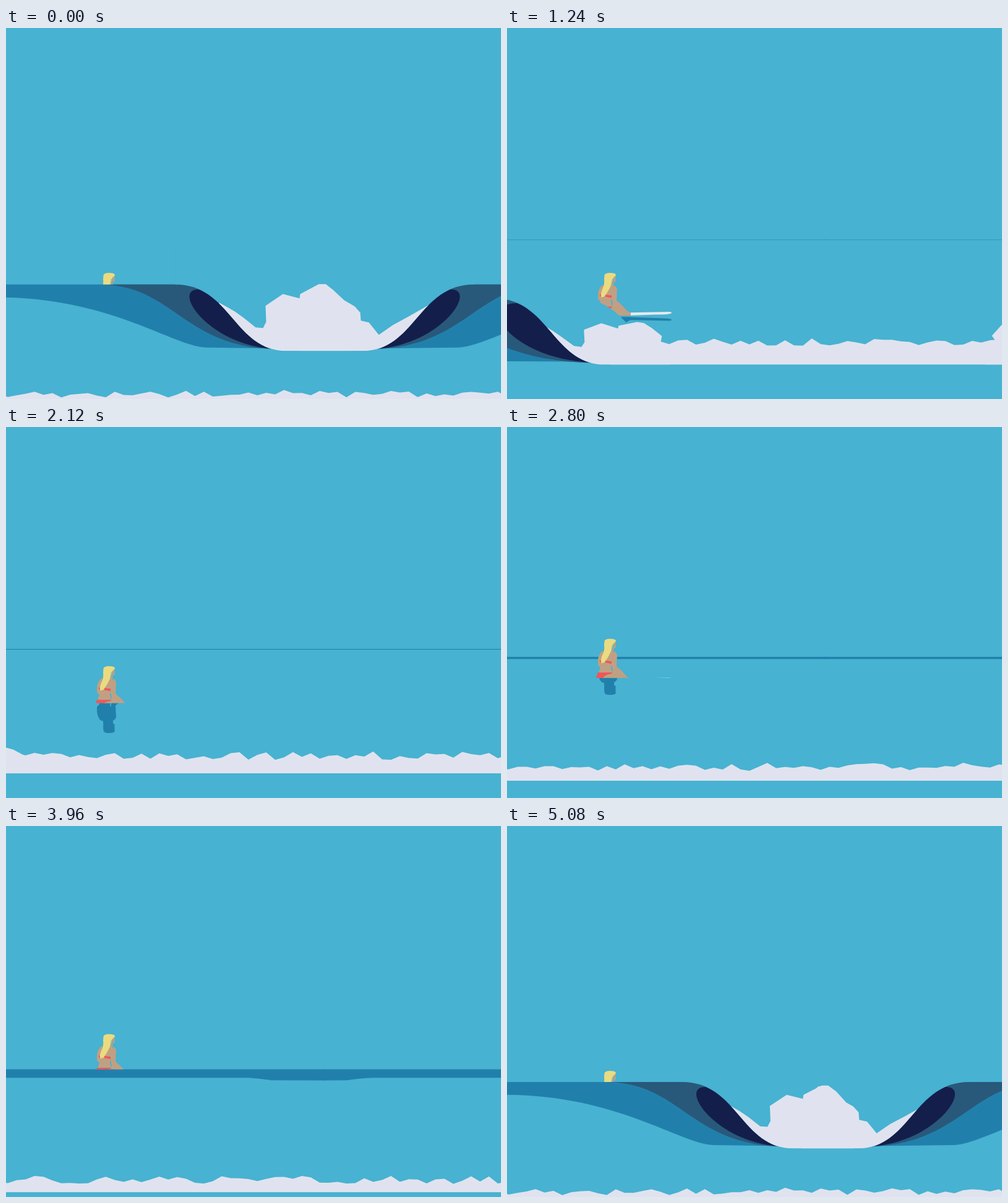
These frames come from a looping animation (800x600 px, 5120 ms). An HTML page with a canvas:

```html
<!DOCTYPE html>
<html lang="en">
<head>
<meta charset="utf-8">
<title>Waves</title>
<style>
html, body { margin: 0; width: 100%; height: 100%; overflow: hidden; background: #47b2d1; }
canvas { display: block; }
</style>
</head>
<body>
<canvas id="stage" width="800" height="600"></canvas>
<script>
const ctx = document.getElementById('stage').getContext('2d');
const LOOP = 5120, STEP = 40;
const SKY = '#47b2d1', BLUE = '#2180ab', SLATE = '#28597a', NAVY = '#141e4b', FOAM = '#e0e3ef';
const CENTER = 515, FACE_WIDTH = 180, FACE_DEPTH = 107.5;

// Layer edges as Bezier points, measured from where the wave's face starts.
const BLUE_EDGE = [[-300, 0], [-110, -4], [-5, 79], [50, 81]];
const SLATE_EDGE = [[-119, 0], [-2, 3], [13, 100], [160, 104.5]];
const NAVY_EDGE = [[36, 8], [-5, 10], [55, 98], [158, 104]];
// Splash outlines: distance from the face start, height above the base.
const SPLASH_LEFT = [[71, 78], [82, 72], [96, 64], [110, 54], [130, 38], [142, 37], [147, 47], [146, 73],
  [174, 92], [201, 85], [202, 92], [232, 108], [243, 108], [256, 98], [272, 80], [270, 62], [285, 44]];
const SPLASH_RIGHT = [[72, 75], [107, 55], [131, 42], [154, 26], [170, 46], [183, 49], [184, 62], [193, 72],
  [210, 82], [224, 95], [240, 108], [252, 106], [268, 80], [258, 55], [279, 45]];

const clamp = v => Math.min(1, Math.max(0, v));
const mix = (a, b, k) => a + (b - a) * k;
function smooth(v) {
  const k = clamp(v);
  return k * k * (3 - 2 * k);
}

function hash(i, k) {
  const v = Math.sin(i * 127.1 + k * 311.7) * 43758.5453;
  return v - Math.floor(v);
}
function noise(i, time) {
  const k = Math.floor(time / 900);
  return mix(hash(i, k), hash(i, k + 1), time / 900 - k) - .5;
}

function fill(color) {
  ctx.fillStyle = color;
  ctx.fill();
}

function crestAt(time) {
  const age = time - LOOP;
  return 414.7 + .0182 * age - 1.2e-7 * age * age;
}

const facePoints = (w, depth) => [[0, 0], [.5 * w, 0], [.53 * w, depth], [w, depth]];

function curve([start, ...rest], x = 0, y = 0, dir = 1) {
  ctx.lineTo(x + dir * start[0], y + start[1]);
  ctx.bezierCurveTo(...rest.flatMap(([px, py]) => [x + dir * px, y + py]));
}

// A wave is a far line at 1160 ms, opens from 4300 ms and breaks outwards from 5080 ms.
function waveAt(time) {
  const rise = clamp((time - 4300) / 780);
  const w = mix(FACE_WIDTH / 2, FACE_WIDTH, rise);
  const half = w + 52 * rise ** 1.5 + .238 * Math.max(0, time - 5080);
  return {
    time, rise, w, half,
    depth: FACE_DEPTH * rise,
    swell: clamp((time - 3900) / 1180),
    spread: clamp((time - LOOP) / 680),
    band: .4 + 20.6 * smooth((time - 1160) / 3900) ** 2
  };
}

// Inner layers peel away from the face as the wave rises; later they lean back.
function drawInnerLayer(wave, points, lean, color) {
  const face = facePoints(wave.w, wave.depth), k = wave.rise ** 2;
  const edge = points.map(([x, y], i) => [
    mix(face[i][0], x, k) - (i % 3 ? lean * wave.spread : 0),
    mix(face[i][1], y, k)
  ]);
  if (color === SLATE) edge[0][0] -= lean * wave.spread;
  ctx.beginPath();
  curve(edge);
  ctx.lineTo(edge[3][0], edge[0][1]);
  fill(color);
}

function drawSide(wave, dir) {
  const { half, swell, band, rise, spread } = wave;
  ctx.save();
  ctx.translate(CENTER - dir * half, 0);
  ctx.scale(dir, 1);

  const lean = (dir < 0 ? 50 - 75 * rise : 0) - 36 * spread;
  ctx.beginPath();
  ctx.moveTo(-2000, 0);
  ctx.lineTo(-2000, band);
  curve(BLUE_EDGE.map(([x, y]) => [x * Math.min(1, swell + .1) + lean, band + y * swell]));
  ctx.lineTo(half + 1, band + 83.5 * swell);
  ctx.lineTo(half + 1, 0);
  fill(BLUE);

  if (rise > 0) {
    drawInnerLayer(wave, SLATE_EDGE, 52, SLATE);
    drawInnerLayer(wave, NAVY_EDGE, 25, NAVY);
  }
  ctx.restore();
}

function drawSplash(wave, points, dir) {
  const growth = clamp((wave.time - 4420) / 700), age = Math.max(0, wave.time - LOOP);
  const xAt = d => CENTER - dir * (wave.half - d * mix(.5, 1, growth));
  ctx.beginPath();
  ctx.moveTo(xAt(points[0][0]), wave.depth);
  for (const [d, h] of points) {
    const sink = clamp(1 - age * d * 1.25e-6);
    ctx.lineTo(xAt(d), wave.depth - h * growth * sink);
  }
  ctx.lineTo(xAt(points[points.length - 1][0]), wave.depth);
  fill(FOAM);
}

function drawFoam({ time, half, depth }) {
  const reach = half - 190, height = 38 - 18 * smooth((time - 5800) / 2800);
  if (reach <= 0) return;
  ctx.save();
  ctx.beginPath();
  ctx.rect(CENTER - reach, -200, 2 * reach, 600);
  ctx.clip();
  ctx.beginPath();
  ctx.moveTo(-12, depth);
  for (let i = -1; i < 58; i++) ctx.lineTo(3 + i * 14.4, depth - height - 14 * noise(i, time));
  ctx.lineTo(840, depth);
  fill(FOAM);
  ctx.restore();
}

function drawWave(time) {
  if (time < 1160) return;
  const wave = waveAt(time), { half, w, depth } = wave;
  ctx.save();
  ctx.translate(0, crestAt(time));
  drawSide(wave, 1);
  drawSide(wave, -1);
  if (depth > 0) {
    // The hollow between both faces holds the white water.
    const face = facePoints(w, depth);
    ctx.beginPath();
    ctx.moveTo(CENTER - half, -60);
    curve(face, CENTER - half, 0);
    curve([...face].reverse(), CENTER + half, 0, -1);
    ctx.lineTo(CENTER + half, -60);
    fill(SKY);
    ctx.clip();
    drawSplash(wave, SPLASH_LEFT, 1);
    drawSplash(wave, SPLASH_RIGHT, -1);
    if (time > LOOP) drawFoam(wave);
  }
  ctx.restore();
}

// Surfer, drawn with the top of the head at y = 317.
const HEAD = 317;
const SURFER = [
  ['#e6e9ee', 'M184 382L262 380.5Q267 381 266 382.5Q264 385 240 385L198 386.5H186Z'],
  ['#c0a083', 'M153 338Q148 343 147 352L147 360L151 364L148 373H170L168 364L169 359L171 368L169 373L163 375Q154 378 152 386.5H200V382L194 379L186 370L177 362L178 344Q177 339 173 338V333L175.5 332V322L170 323L165 335Z'],
  ['#f25558', 'M147 372H170L169 374Q156 375 152 386.5L145 385L144 380ZM150 352L154 353L153 357L150 355ZM159 353L169 354L169 358L159 356Z'],
  ['#eadb80', 'M157.5 321Q159 317.5 166 317.5Q175 317.5 176 320.5L175 323Q172 323 171 329Q169 337 165 344Q162 350 157 356L152 357Q151 350 155 342Q158 336 157 328Z']
].map(([color, d]) => [color, new Path2D(d)]);
const STRANDS = new Path2D('M172.5 326V340M170.5 327L169 337');

function headAt(t) {
  if (t < 3440) return 395.5 - 79.2 * smooth((t - 1760) / 1680);
  return Math.min(395.5, 316.3 + 73 * ((t - 3440) / 1000) ** 2);
}

function drawSurfer(t) {
  const water = t < 3500 ? 466 - 81 * smooth((t - 1500) / 1940) : crestAt(t);
  const mirror = 537 - 138 * smooth((t - 1320) / 2200);

  // The passing wave hides what is behind its back.
  const passing = t + LOOP, y = crestAt(passing);
  ctx.save();
  ctx.beginPath();
  ctx.moveTo(-2000, 0);
  ctx.lineTo(-2000, y);
  curve(facePoints(FACE_WIDTH, FACE_DEPTH), CENTER - waveAt(passing).half + 135, y);
  ctx.lineTo(1000, y + FACE_DEPTH);
  ctx.lineTo(1000, 0);
  ctx.clip();

  ctx.save();
  ctx.beginPath();
  ctx.rect(0, water, 800, 600);
  ctx.clip();
  ctx.translate(0, mirror + HEAD);
  ctx.scale(1, -1);
  ctx.fillStyle = BLUE;
  for (const [, path] of SURFER) ctx.fill(path);
  ctx.restore();

  ctx.beginPath();
  ctx.rect(0, 0, 800, water);
  ctx.clip();
  ctx.translate(0, headAt(t) - HEAD);
  for (const [color, path] of SURFER) {
    ctx.fillStyle = color;
    ctx.fill(path);
  }
  ctx.strokeStyle = SKY;
  ctx.lineWidth = .8;
  ctx.stroke(STRANDS);
  ctx.restore();
}

function frame() {
  const t = Math.floor(performance.now() % LOOP / STEP) * STEP;
  ctx.fillStyle = SKY;
  ctx.fillRect(0, 0, 800, 600);
  for (const age of [2, 1, 0]) drawWave(t + age * LOOP);
  drawSurfer(t);
  requestAnimationFrame(frame);
}
frame();
</script>
</body>
</html>
```
